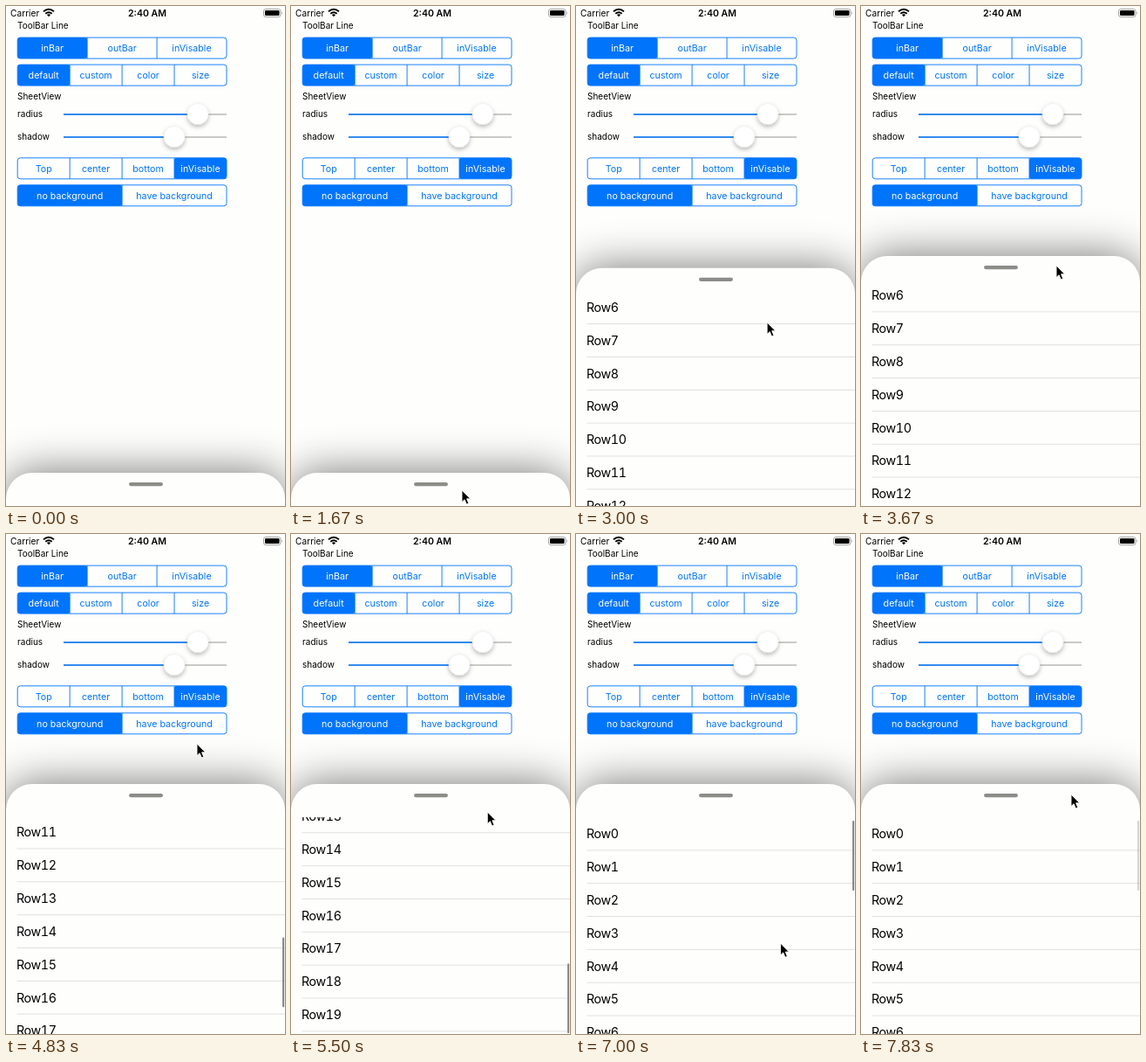
Recreate the animation shown at these times as an HTML page. Size 320x572 px, loop 8000 ms.

```html
<!DOCTYPE html>
<html lang="en">
<head>
<meta charset="utf-8">
<title>Bottom sheet demo</title>
<style>
  html, body { margin: 0; width: 100%; height: 100%; overflow: hidden; background: #fefefd; }
  svg { display: block; }
  text { font: 10px Inter, "Open Sans", sans-serif; fill: #000; }
  .seg { font-size: 10.7px; text-anchor: middle; }
  .row { font-size: 14.3px; letter-spacing: -.4px; font-feature-settings: "tnum"; }
  .status { font-size: 10.2px; }
  .clock { font-size: 10.6px; font-weight: 600; text-anchor: middle; }
</style>
</head>
<body>
<svg width="100%" height="100%" viewBox="0 0 320 572">
  <defs>
    <filter id="soft" filterUnits="userSpaceOnUse" x="-100" y="-100" width="520" height="900">
      <feGaussianBlur stdDeviation="25"/>
    </filter>
    <filter id="lift" x="-50%" y="-50%" width="200%" height="220%">
      <feDropShadow dx="0" dy="2.5" stdDeviation="2.5" flood-opacity=".28"/>
    </filter>
  </defs>
  <rect width="320" height="572" fill="#fefefd"/>
  <text class="status" x="5" y="11.7">Carrier</text>
  <g fill="none" stroke="#000" stroke-width="1.8">
    <path d="M43 6.3Q49 1.2 55 6.3M45.3 8.7Q49 5.7 52.7 8.7"/>
    <path d="M49 12.2L46.9 10Q49 8.5 51.1 10Z" fill="#000" stroke="none"/>
  </g>
  <text class="clock" x="162" y="11.7">2:40 AM</text>
  <rect x="295.5" y="3.5" width="19.5" height="9" rx="2.4" fill="none" stroke="#999" stroke-width=".9"/>
  <rect x="297" y="5" width="16.5" height="6" rx="1.2"/>
  <path d="M316 6.3Q317.6 8 316 9.7Z" fill="#999"/>
  <text x="13" y="26">ToolBar Line</text>
  <text x="13" y="107">SheetView</text>
  <g id="controls"></g>
  <g id="sheet">
    <rect width="320" height="700" rx="30" fill="#08080c" opacity=".55" filter="url(#soft)"/>
    <rect width="320" height="700" rx="30" fill="#fefefd"/>
    <rect x="141" y="11" width="39" height="4.2" rx="2.1" fill="#8c8c88"/>
    <svg y="38" width="320" height="248"><g id="rows"></g></svg>
    <rect id="bar" x="317" width="2.2" height="80" rx="1.1" fill="#8a8a8a"/>
  </g>
  <path id="cursor" d="M0 0V13.6L3.1 10.7L5.3 16L7.8 15L5.6 9.8H9.8Z" stroke="#fff" stroke-width=".9"/>
</svg>
<script>
const FRAMES = 48, LOOP = 8000, PITCH = 37.84, BLUE = '#0074fb';
const $ = id => document.getElementById(id);

function segments(y, labels, active) {
  const left = 13.2, width = 239.8, w = width / labels.length;
  const box = `<rect x="${left}" y="${y}" width="${width}" height="24" rx="3.2"`;
  let out = `${box} fill="#fefefd"/>
    <rect x="${left + active * w}" y="${y}" width="${w}" height="24" rx="2.5" fill="${BLUE}"/>`;
  labels.forEach((label, i) => {
    const x = left + i * w;
    if (i) out += `<path d="M${x} ${y}v24" stroke="${BLUE}" stroke-width=".9"/>`;
    out += `<text class="seg" x="${x + w / 2}" y="${y + 15.9}" style="fill:${i === active ? '#fff' : BLUE}">${label}</text>`;
  });
  return `${out}${box} fill="none" stroke="${BLUE}" stroke-width=".9"/>`;
}

function slider(y, label, thumb) {
  return `<text x="13" y="${y + 3}">${label}</text>
    <path d="M66 ${y}H253" stroke="#b8b8b4" stroke-width="1.7"/>
    <path d="M66 ${y}H${thumb}" stroke="${BLUE}" stroke-width="1.7"/>
    <circle cx="${thumb}" cy="${y - .5}" r="12" fill="#fff" stroke="#e6e6e4" stroke-width=".5" filter="url(#lift)"/>`;
}

$('controls').innerHTML =
  segments(36.1, ['inBar', 'outBar', 'inVisable'], 0) +
  segments(67.1, ['default', 'custom', 'color', 'size'], 0) +
  slider(124, 'radius', 220) +
  slider(150, 'shadow', 193) +
  segments(173.8, ['Top', 'center', 'bottom', 'inVisable'], 3) +
  segments(204.8, ['no background', 'have background'], 0);

$('rows').innerHTML = Array.from({ length: 20 }, (_, i) =>
  `<text class="row" x="12" y="${i * PITCH + 24.2}">Row${i}</text>
   <path d="M12.5 ${(i + 1) * PITCH}H320" stroke="#d4d4d0" stroke-width=".7"/>`).join('');

const span = (step, from, to) => Math.min(1, Math.max(0, (step - from) / (to - from)));
const smooth = u => u * u * (3 - 2 * u);
const glide = u => 1 - (1 - u) ** 1.54;

// Pointer stops: step, x, y
const stops = [[8, 230, 595], [10, 196, 554], [15, 216, 404], [22, 224, 297], [25, 222, 420],
  [29, 219, 240], [34, 226, 327], [38, 230, 590], [47, 241, 298]];

function pointer(step) {
  const i = Math.max(1, stops.findIndex(stop => stop[0] >= step));
  const [t0, x0, y0] = stops[i - 1], [t1, x1, y1] = stops[i];
  const k = smooth(span(step, t0, t1));
  return [x0 + (x1 - x0) * k, y0 + (y1 - y0) * k];
}

const move = (id, x, y) => $(id).setAttribute('transform', `translate(${x} ${y})`);

function draw(time) {
  const step = Math.min(FRAMES - 1, Math.floor((time % LOOP + 5) * FRAMES / LOOP));
  const scroll = 239 + 273 * glide(span(step, 25, 33)) - 512 * smooth(span(step, 34, 42));
  move('sheet', 0, 534 - 248 * smooth(span(step, 12, 19)));
  move('rows', 0, -scroll);
  move('bar', 0, 42 + scroll * .319);
  $('bar').setAttribute('opacity', span(step, 25, 26) - .65 * span(step, 45, 47));
  move('cursor', ...pointer(step));
}

const start = performance.now();
function tick() {
  draw(performance.now() - start);
  requestAnimationFrame(tick);
}
tick();
</script>
</body>
</html>
```
